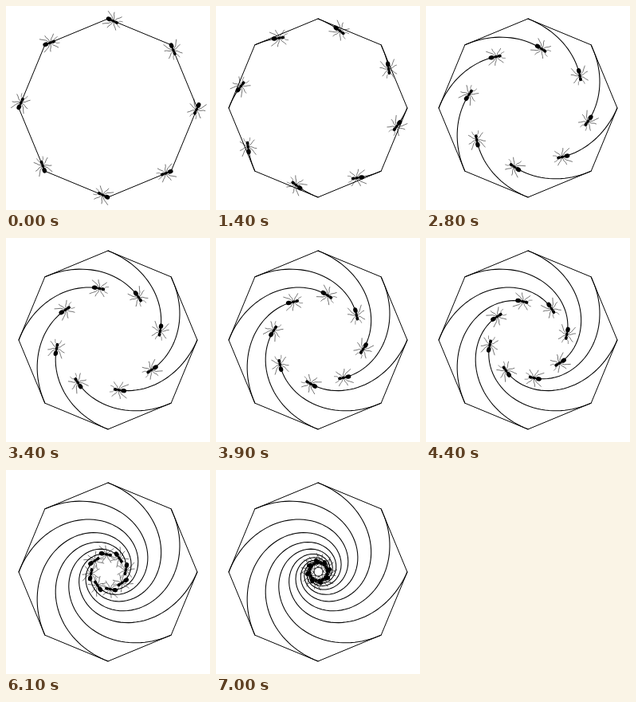
Recreate the animation shown at these times as an HTML page with a canvas. Size 256 px wide and 256 px high, loop 8000 ms.

```html
<!DOCTYPE html>
<html lang="en">
<head>
<meta charset="utf-8">
<title>Eight ants in pursuit</title>
<style>
  html, body { margin: 0; width: 100%; height: 100%; overflow: hidden; background: #fff; }
  canvas { display: block; width: 256px; height: 256px; }
</style>
</head>
<body>
<canvas id="stage" width="256" height="256"></canvas>
<script>
const ctx = document.getElementById("stage").getContext("2d");
const LOOP = 8000, HOLD = 1000, STEP_MS = 100, STEPS = 61;
const COUNT = 8, RADIUS = 112, STRIDE = 4.92, LATE = 2;

const corners = Array.from({ length: COUNT }, (_, i) => {
  const a = i * 2 * Math.PI / COUNT;
  return [RADIUS * Math.sin(a), -RADIUS * Math.cos(a)];
});

// Every ant steps toward where the next one clockwise stands.
function aim(spots, i) {
  const [x, y] = spots[i], [tx, ty] = spots[(i + 1) % COUNT];
  return Math.atan2(ty - y, tx - x);
}

function advance(spots) {
  return spots.map(([x, y], i) => {
    const a = aim(spots, i);
    return [x + STRIDE * Math.cos(a), y + STRIDE * Math.sin(a)];
  });
}

// All but one ant have already taken a step when the loop begins.
const walk = [advance(corners)];
walk[0][LATE] = corners[LATE];
for (let k = 0; k < STEPS; k++) walk.push(advance(walk[k]));

function line(points, width) {
  ctx.lineWidth = width;
  ctx.beginPath();
  for (const [x, y] of points) ctx.lineTo(x, y);
  ctx.stroke();
}

function blob(x, rx, ry) {
  ctx.beginPath();
  ctx.ellipse(x, 0, rx, ry, 0, 0, 2 * Math.PI);
  ctx.fill();
}

// Faces along +x, centred on the thorax.
function ant() {
  blob(-5, 3.5, 2.7);
  blob(-1.2, 1.2, 1);
  blob(1.2, 2.5, 1.6);
  blob(5.5, 2.5, 2);
  for (const side of [-1, 1]) {
    const limb = (width, ...pts) => line(pts.map(([x, y]) => [x, y * side]), width);
    limb(0.5, [0.3, 0.8], [-3, 4.8], [-6.4, 6.6], [-9.8, 8.6]);
    limb(0.5, [1.2, 1], [0.2, 5], [-1.6, 8], [-2.2, 10.4]);
    limb(0.5, [2.2, 0.8], [4, 4.4], [6.6, 6.6], [8.6, 9]);
    limb(0.4, [6.8, 0.8], [8.6, 3.2], [12, 4]);
  }
}

function render(t) {
  const k = t < HOLD ? 0 : Math.min(STEPS, Math.floor((t - HOLD) / STEP_MS) + 1);
  const spots = walk[k];
  ctx.setTransform(1, 0, 0, 1, 0, 0);
  ctx.fillStyle = "#fff";
  ctx.fillRect(0, 0, 256, 256);
  ctx.translate(128, 128);
  ctx.fillStyle = ctx.strokeStyle = "#000";
  ctx.lineJoin = ctx.lineCap = "round";

  line([...corners, corners[0]], 1);
  corners.forEach((corner, i) => {
    if (k) line([corner, ...walk.slice(0, k + 1).map(s => s[i])], 1.05);
  });
  spots.forEach(([x, y], i) => {
    ctx.save();
    ctx.translate(x, y);
    ctx.rotate(aim(spots, i));
    ctx.translate(1.2, 0);
    ant();
    ctx.restore();
  });
}

const start = performance.now();
function tick() {
  render((performance.now() - start) % LOOP);
  requestAnimationFrame(tick);
}
tick();
</script>
</body>
</html>
```
